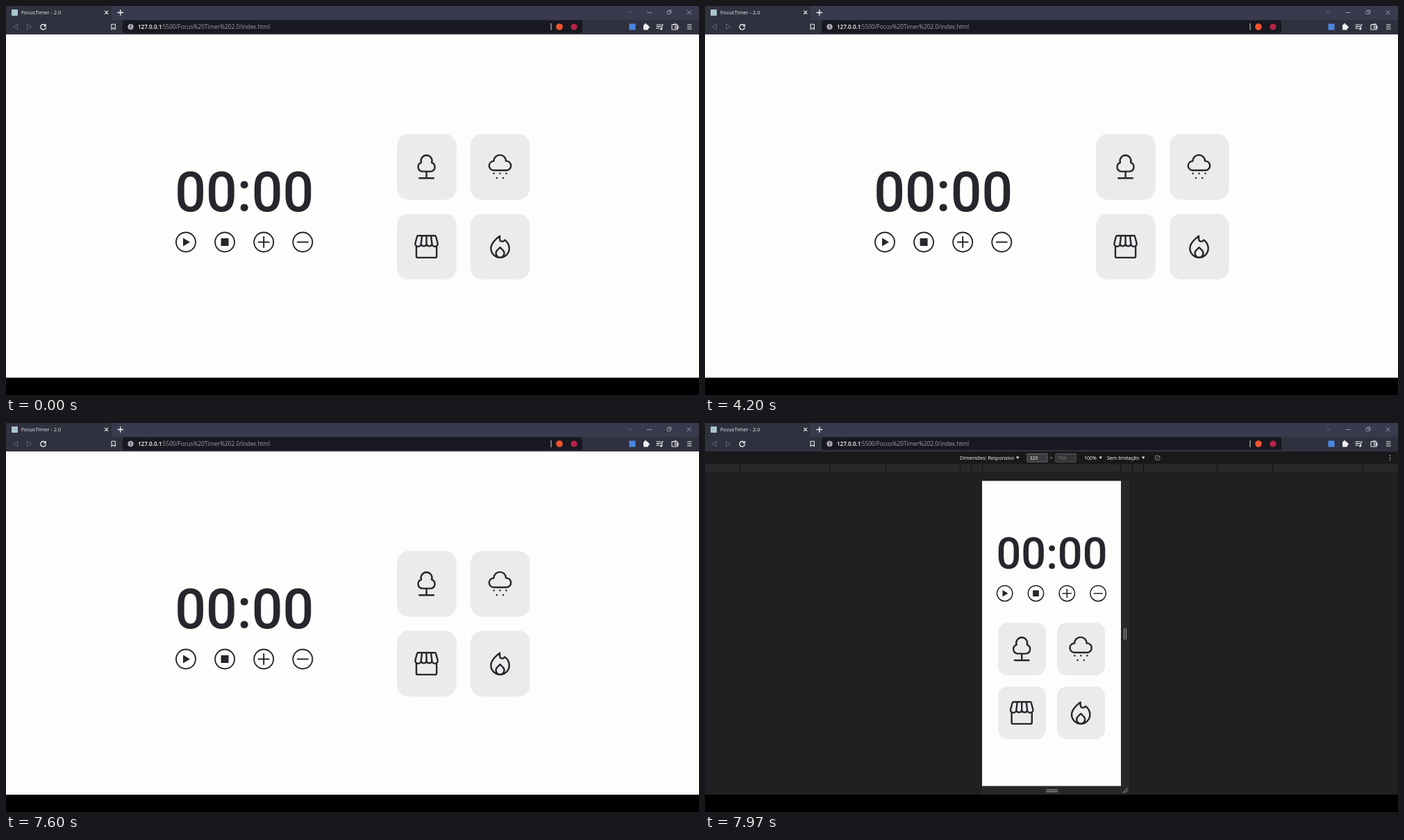
An HTML page with a canvas for the animation above (8 s loop, 998x561 px).

```html
<!DOCTYPE html>
<html lang="pt">
<head>
<meta charset="utf-8">
<title>FocusTimer - 2.0</title>
<style>
html, body { margin: 0; width: 100%; height: 100%; overflow: hidden; background: #000; }
canvas { display: block; width: 998px; height: 561px; }
</style>
</head>
<body>
<canvas id="stage" width="998" height="561"></canvas>
<script>
const ctx = document.getElementById('stage').getContext('2d');
const LOOP = 8000;
const INK = '#26262c';
const PAPER = '#fdfdfb';
const UI = '"Open Sans", "Noto Sans", sans-serif';

function rect(x, y, w, h, color) {
  ctx.fillStyle = color;
  ctx.fillRect(x, y, w, h);
}

function round(x, y, w, h, r, color) {
  ctx.fillStyle = color;
  ctx.beginPath();
  ctx.roundRect(x, y, w, h, r);
  ctx.fill();
}

function disc(x, y, r, color) {
  ctx.fillStyle = color;
  ctx.beginPath();
  ctx.arc(x, y, r, 0, Math.PI * 2);
  ctx.fill();
}

function text(str, x, y, size, color, weight = 400, font = UI, align = 'left') {
  ctx.font = `${weight} ${size}px ${font}`;
  ctx.textAlign = align;
  ctx.fillStyle = color;
  ctx.fillText(str, x, y);
}

function at(x, y, scale, draw) {
  ctx.save();
  ctx.translate(x, y);
  ctx.scale(scale, scale);
  draw();
  ctx.restore();
}

function line(d, color = INK, width = 2.4) {
  ctx.strokeStyle = color;
  ctx.lineWidth = width;
  ctx.stroke(new Path2D(d));
}

function fill(d, color = INK) {
  ctx.fillStyle = color;
  ctx.fill(new Path2D(d));
}

const buttons = [
  () => fill('M-4-6L6 0L-4 6Z'),
  () => rect(-5.5, -5.5, 11, 11, INK),
  () => line('M-7.5 0H7.5M0-7.5V7.5', INK, 2),
  () => line('M-7.5 0H7.5', INK, 2)
];

function tree() {
  line('M-6 6.6A6.6 6.6 0 0 1-7.6-6.2A8 8 0 1 1 7.6-6.2A6.6 6.6 0 0 1 6 6.6Z' +
       'M0 6.6V16.2M-10.3 16.2H10.3');
}

function rain() {
  line('M-9.2 5A6.6 6.6 0 0 1-9-8.4A8.6 8.6 0 0 1 8.4-8.4A6.6 6.6 0 0 1 9.4 5Z');
  for (const x of [-9, 0, 9]) disc(x, 9.5, 1.25, INK);
  for (const x of [-4.6, 4.6]) disc(x, 16, 1.25, INK);
}

function shop() {
  line('M-12-15.8H12Q13.3-15.8 13.6-14.5L16.2-4.5A4 4 0 0 1 7.9-4A4 4 0 0 1 0-4' +
       'A4 4 0 0 1-7.9-4A4 4 0 0 1-16.2-4.5L-13.6-14.5Q-13.3-15.8-12-15.8Z' +
       'M-6.4-15.8L-7.9-4M0-15.8V-4M6.4-15.8L7.9-4' +
       'M-14.6 0V14Q-14.6 15.9-12.7 15.9H12.7Q14.6 15.9 14.6 14V0');
}

function flame() {
  line('M-.5-15.2C-6-11.5-13.2-4.5-13.2 2.6A13.2 13.2 0 0 0 13.2 2.6' +
       'C13.2-2.5 10.5-7 6.8-9.6L6-8.8C3.8-6.2-.5-7.4-.5-11Z' +
       'M0 1.2L-4.4 5.5A6.2 6.2 0 0 0 0 15.8A6.2 6.2 0 0 0 4.4 5.5Z');
}

const cards = [tree, rain, shop, flame];

function timer(cx, base, size) {
  text('00:00', cx, base, size, INK, 500, 'Roboto, sans-serif', 'center');
}

function controls(x, y, step, scale) {
  buttons.forEach((icon, i) => at(x + i * step, y, scale, () => {
    line('M-14 0A14 14 0 1 1 14 0A14 14 0 1 1-14 0', INK, 1.9);
    icon();
  }));
}

function grid(x, y, w, h, dx, dy, r) {
  cards.forEach((icon, i) => {
    const left = x + (i % 2) * dx, top = y + (i >> 1) * dy;
    round(left, top, w, h, r, '#ebebeb');
    at(left + w / 2 - 0.3, top + h / 2, 1, icon);
  });
}

function browser() {
  rect(0, 0, 998, 41, '#393a4d');
  rect(0, 0, 152, 20, '#30313f');
  rect(0, 20, 998, 21, '#30313f');

  round(8, 5, 9, 9, 1, '#a9c4d0');
  text('FocusTimer - 2.0', 22, 12, 7.5, '#f1f1f4');
  line('M142.5 7.2L146.8 11.5M146.8 7.2L142.5 11.5', '#eee', 1.1);
  line('M161 9.5H168.5M164.75 5.7V13.3', '#f4f4f6', 1.3);

  line('M895 8L897.8 10.6L900.6 8', '#777787', 0.8);
  line('M923.5 9.5H929.5', '#a6a6b0', 0.9);
  line('M952.5 7.5H956.5V11.5H952.5ZM954 7.5V6H958V10H956.5', '#a6a6b0', 0.8);
  line('M981 6.5L986.5 12M986.5 6.5L981 12', '#a6a6b0', 0.9);

  line('M16.5 26.5V33.5L10.5 30Z', '#666775', 1);
  line('M30.5 26.5V33.5L36.5 30Z', '#666775', 1);
  line('M56.8 28.3A3.8 3.8 0 1 0 57.3 31', '#f0f0f3', 1.3);
  fill('M57.8 25.6V29.4H54Z', '#f0f0f3');
  line('M152 26.2H157.3V33.8L154.65 31.6L152 33.8Z', '#e8e8ec', 1.1);

  round(168, 20.5, 662, 18.5, 3, '#171820');
  disc(179.5, 30, 4.2, '#a9aab3');
  rect(179, 27.4, 1, 3.2, '#171820');
  rect(179, 31.6, 1, 1, '#171820');
  text('127.0.0.1', 190, 33, 8.1, '#fff', 600);
  text(':5500/Focus%20Timer%202.0/index.html', 223.5, 33, 8.25, '#a0a1aa');
  rect(784.5, 25, 1, 10, '#d5d5da');
  disc(797, 30, 4.8, '#f0532d');
  disc(818, 30, 4.6, '#b5224a');

  rect(897.5, 25.5, 9, 9, '#4a86e0');
  round(918, 27, 7, 7.5, 1, '#f1f1f4');
  disc(921, 26.7, 1.6, '#f1f1f4');
  disc(925.3, 30.5, 1.6, '#f1f1f4');
  line('M937 27H943M937 29.6H943M937 32.2H940.5M944.7 33V27H946.5', '#f1f1f4', 1.1);
  disc(943.5, 33, 1.5, '#f1f1f4');
  line('M959 27H967V34H959ZM959 27L965 25.7V27M963.5 29.3H968V32H963.5Z', '#e8e8ec', 1.1);
  line('M981.5 27H987M981.5 30H987M981.5 33H987', '#f1f1f4', 1.2);
}

function desktopPage() {
  rect(0, 41, 998, 495, PAPER);
  timer(343.3, 296.3, 78.75);
  controls(259, 340.5, 56.1, 1);
  grid(563, 184.5, 85.7, 95, 106, 115, 17);
}

function pointer(alpha) {
  ctx.globalAlpha = alpha;
  at(438.3, 144.3, 1, () => {
    const shape = 'M0 0V10.2L2.3 8L4 11.7L5.7 11L4.1 7.4H7.3Z';
    fill(shape, '#fff');
    line(shape, '#62626b', 0.9);
  });
  ctx.globalAlpha = 1;
}

function dropdown(x, y) {
  fill(`M${x} ${y}h4.4l-2.2 3.6Z`, '#f0f0f0');
}

function barText(str, x, color = '#fff') {
  text(str, x, 53, 7.05, color, 500);
}

function sizeBox(x, str, border, back, color) {
  round(x, 44, 30, 12.5, 1, border);
  rect(x + 0.8, 44.8, 28.4, 10.9, back);
  barText(str, x + 4, color);
}

function deviceBar() {
  rect(0, 42, 998, 16.5, '#18191a');
  barText('Dimensões: Responsivo', 367);
  dropdown(448, 48.4);
  sizeBox(463.5, '320', '#77797e', '#3a3b3e', '#fff');
  text('×', 496.2, 53.2, 8, '#95969c');
  sizeBox(504.5, '706', '#606166', '#343537', '#777880');
  barText('100%', 546);
  dropdown(567.5, 48.4);
  barText('Sem limitação', 579);
  dropdown(629, 48.4);
  line('M649 47.3H653.5L655 49V52.5L653.5 53.5H650L648.5 52V49ZM650 52L654 48', '#92939a', 0.9);
  for (const y of [46.8, 50, 53.2]) disc(986.5, y, 0.8, '#cfd0d4');

  rect(0, 58.5, 998, 11.5, '#28292b');
  rect(0, 58.5, 998, 0.8, '#141518');
  for (const x of [50, 180, 260, 367, 383, 399, 598, 615, 631, 737, 817, 947]) {
    rect(x, 59, 1, 11, '#111214');
  }
}

function resizers() {
  rect(599, 83, 12, 453, '#27282a');
  rect(399, 523, 212, 13, '#27282a');
  line('M603.6 296.5V312M606.4 296.5V312', '#a9aaae', 1);
  line('M492 529H507.5M492 531.8H507.5', '#b9babd', 1);
  line('M601.5 533.5L608.5 526.5M605 533.5L608.5 530', '#a9aaae', 1);
}

function mobileView(t) {
  rect(0, 41, 998, 495, '#202022');
  if (t >= 7870) {
    deviceBar();
    resizers();
  }
  rect(399, 83.5, 200, 440, PAPER);
  if (t >= 7900) {
    timer(499.5, 210, 63);
    controls(431.7, 245.7, 44.8, 0.8);
    grid(422, 288, 69, 76, 85, 92, 14);
  }
}

function pointerAlpha(t) {
  if (t < 5200 || t >= 5770) return 0;
  return t < 5630 ? 1 : 1 - (t - 5630) / 140;
}

function draw(t) {
  rect(0, 0, 998, 561, '#000');
  if (t < 7830) {
    desktopPage();
    const alpha = pointerAlpha(t);
    if (alpha > 0) pointer(alpha);
  } else {
    mobileView(t);
  }
  browser();
}

ctx.lineJoin = 'round';
ctx.lineCap = 'round';

function tick() {
  draw(performance.now() % LOOP);
  requestAnimationFrame(tick);
}
tick();
</script>
</body>
</html>
```
